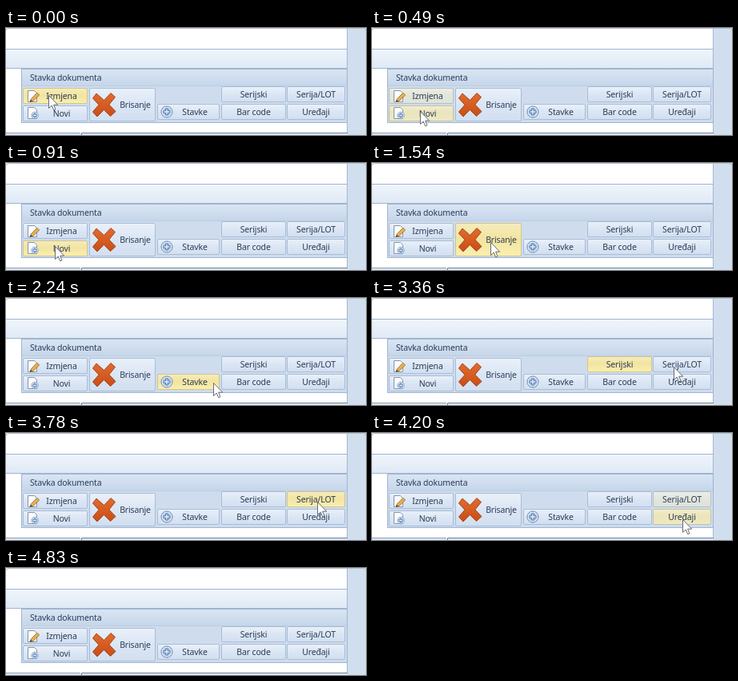
An HTML page for the animation above (5040 ms loop, 450 px wide and 134 px high).

```html
<!DOCTYPE html>
<html lang="hr">
<head>
<meta charset="utf-8">
<style>
  html, body { margin: 0; width: 100%; height: 100%; overflow: hidden; background: #fff; }
  svg { display: block; }
  text { font: 10.5px "Noto Sans", "Open Sans", sans-serif; letter-spacing: -.15px; fill: #2b3c58; }
  #labels text { text-anchor: middle; }
</style>
</head>
<body>
<svg width="450" height="134" viewBox="0 0 450 134">
  <defs>
    <linearGradient id="band" x2="0" y2="1"><stop stop-color="#f0f5fb"/><stop offset="1" stop-color="#dfe9f5"/></linearGradient>
    <linearGradient id="head" x2="0" y2="1"><stop stop-color="#d9e5f3"/><stop offset="1" stop-color="#c6d6ea"/></linearGradient>
    <linearGradient id="cold" x2="0" y2="1"><stop stop-color="#e9f0f9"/><stop offset=".5" stop-color="#dbe6f4"/><stop offset="1" stop-color="#d2dff0"/></linearGradient>
    <linearGradient id="warm" x2="0" y2="1"><stop stop-color="#f5ecbe"/><stop offset=".45" stop-color="#f2e4a0"/><stop offset="1" stop-color="#f9efaf"/></linearGradient>
    <linearGradient id="cross" x2="0" y2="1"><stop stop-color="#e26c2e"/><stop offset="1" stop-color="#c94d16"/></linearGradient>
    <g id="plus">
      <circle r="7" fill="#eef4fb" stroke="#6483ad"/>
      <circle r="5.4" fill="#a9c5e6"/>
      <path d="M0-4.3V4.3M-4.3 0H4.3" stroke="#3f679f" stroke-width="3.2"/>
      <path d="M0-3.5V3.5M-3.5 0H3.5" stroke="#f4f9fe" stroke-width="1.4"/>
    </g>
    <path id="page" d="M.5.5H8.5L11.5 3.5V14.5H.5Z" fill="#fbfcfe" stroke="#8494ab"/>
  </defs>

  <rect width="450" height="134" fill="#fff"/>
  <rect y="26" width="427" height="25" fill="url(#band)"/>
  <path d="M0 26.5H427M0 50.5H427" stroke="#9fb4d1"/>
  <rect x="426" width="24" height="134" fill="#d1deee"/>
  <path d="M426.5 0V134" stroke="#a3b7d3"/>
  <path d="M0 3Q0 .5 4 .5H446Q450 .5 450 3" fill="none" stroke="#b3c0d0"/>
  <rect y="132" width="427" height="2" fill="#dce7f4"/>
  <path d="M0 131.5H93" stroke="#8e9fb5"/>
  <path d="M94.5 134V131.5H427" fill="none" stroke="#6f8098"/>

  <rect x="19.5" y="51.5" width="407" height="67" fill="#cfdcee" stroke="#a0b5d1"/>
  <rect x="20" y="52" width="406" height="20" fill="url(#head)"/>
  <path d="M20 72.5H426" stroke="#bccde2"/>
  <text x="30" y="66">Stavka dokumenta</text>

  <g id="buttons"></g>

  <use href="#page" x="27" y="78"/>
  <path d="M30 92.5L31.3 89 38.8 81.2 41.6 84 34 91.4Z" fill="#eeb04a" stroke="#80602e" stroke-width=".8"/>
  <path d="M30 92.5L31 90 32.7 91.6Z" fill="#3d3428"/>
  <use href="#page" x="27" y="99"/>
  <use href="#plus" transform="translate(36 109.5) scale(.62)"/>
  <use href="#plus" x="201" y="105"/>
  <path d="M113 82L122.5 90.5 131 81.5 136.5 86.5 128.8 96 137 104.5 130.5 110.5 122.3 102.4 114 111 108.5 105 116 96.2 108.5 88Z"
    fill="url(#cross)" stroke="#a4441a" stroke-linejoin="round"/>
  <g id="labels"></g>
  <path id="cursor" d="M.5.5V16.5L4.2 13 6.7 18.8 9 17.8 6.6 12.2H11.7Z" fill="#fff" stroke="#666b75"/>
</svg>
<script>
  const LOOP = 5040, STEP = 70, TRAVEL = 280, FADE = 210, EXIT = 4830;
  const ROW = 22;

  const columns = [
    { x: 21, w: 81, top: 75, icon: 16, labels: ['Izmjena', 'Novi'] },
    { x: 104, w: 83, top: 75, icon: 32, h: 42, labels: ['Brisanje'] },
    { x: 189, w: 78, top: 95, icon: 16, labels: ['Stavke'] },
    { x: 269, w: 81, top: 73, labels: ['Serijski', 'Bar code'] },
    { x: 351, w: 73, top: 73, labels: ['Serija/LOT', 'Uređaji'] }
  ];

  // Each visit: button, cursor tip, time the cursor sets off towards it
  const visits = [
    { label: 'Izmjena', tip: [53, 84], start: -LOOP },
    { label: 'Novi', tip: [60, 104], start: 70 },
    { label: 'Brisanje', tip: [146, 99], start: 890 },
    { label: 'Stavke', tip: [256, 106], start: 1520 },
    { label: 'Bar code', tip: [304, 104], start: 2200 },
    { label: 'Serijski', tip: [314, 87], start: 2590 },
    { label: 'Serija/LOT', tip: [389, 86], start: 3150 },
    { label: 'Uređaji', tip: [388, 108], start: 3770 }
  ];

  const $ = id => document.getElementById(id);
  const ramp = (t, start, length) => Math.max(0, Math.min(1, (t - start) / length));
  const ease = k => k * k * (3 - 2 * k);

  function add(parent, tag, attrs, text = '') {
    const node = document.createElementNS('http://www.w3.org/2000/svg', tag);
    for (const key in attrs) node.setAttribute(key, attrs[key]);
    node.textContent = text;
    return parent.appendChild(node);
  }

  const glows = {};
  for (const { x, w, top, h = 20, icon = 0, labels } of columns) {
    labels.forEach((label, row) => {
      const y = top + row * ROW;
      const box = { x: x + .5, y: y + .5, width: w - 1, height: h - 1, rx: 1.5 };
      add($('buttons'), 'rect', { ...box, fill: 'url(#cold)', stroke: '#a9bdd7' });
      glows[label] = add($('buttons'), 'rect', { ...box, fill: 'url(#warm)', stroke: '#d3c68c' });
      add($('labels'), 'text', { x: x + (w + icon) / 2, y: y + h / 2 + 4 }, label);
    });
  }

  // A button lights up on arrival and dims when the next one is reached.
  const glowAt = (visit, t) => visit ? ramp(t, visit.start + TRAVEL, FADE) : 0;

  function tipAt(t) {
    return visits.reduce((from, { tip, start }) => {
      const k = ease(ramp(t, start, TRAVEL));
      return from.map((v, axis) => v + (tip[axis] - v) * k);
    }, visits[0].tip).map(Math.round);
  }

  function draw(time) {
    const t = Math.floor((time % LOOP) / STEP) * STEP;
    const gone = t >= EXIT;
    visits.forEach((visit, i) => {
      const level = glowAt(visit, t) - glowAt(visits[i + 1], t);
      glows[visit.label].setAttribute('opacity', gone ? 0 : level);
    });
    $('cursor').setAttribute('transform', `translate(${tipAt(t)})`);
    $('cursor').setAttribute('visibility', gone ? 'hidden' : 'visible');
  }

  const begin = performance.now();
  function tick() {
    draw(performance.now() - begin);
    requestAnimationFrame(tick);
  }
  tick();
</script>
</body>
</html>
```
